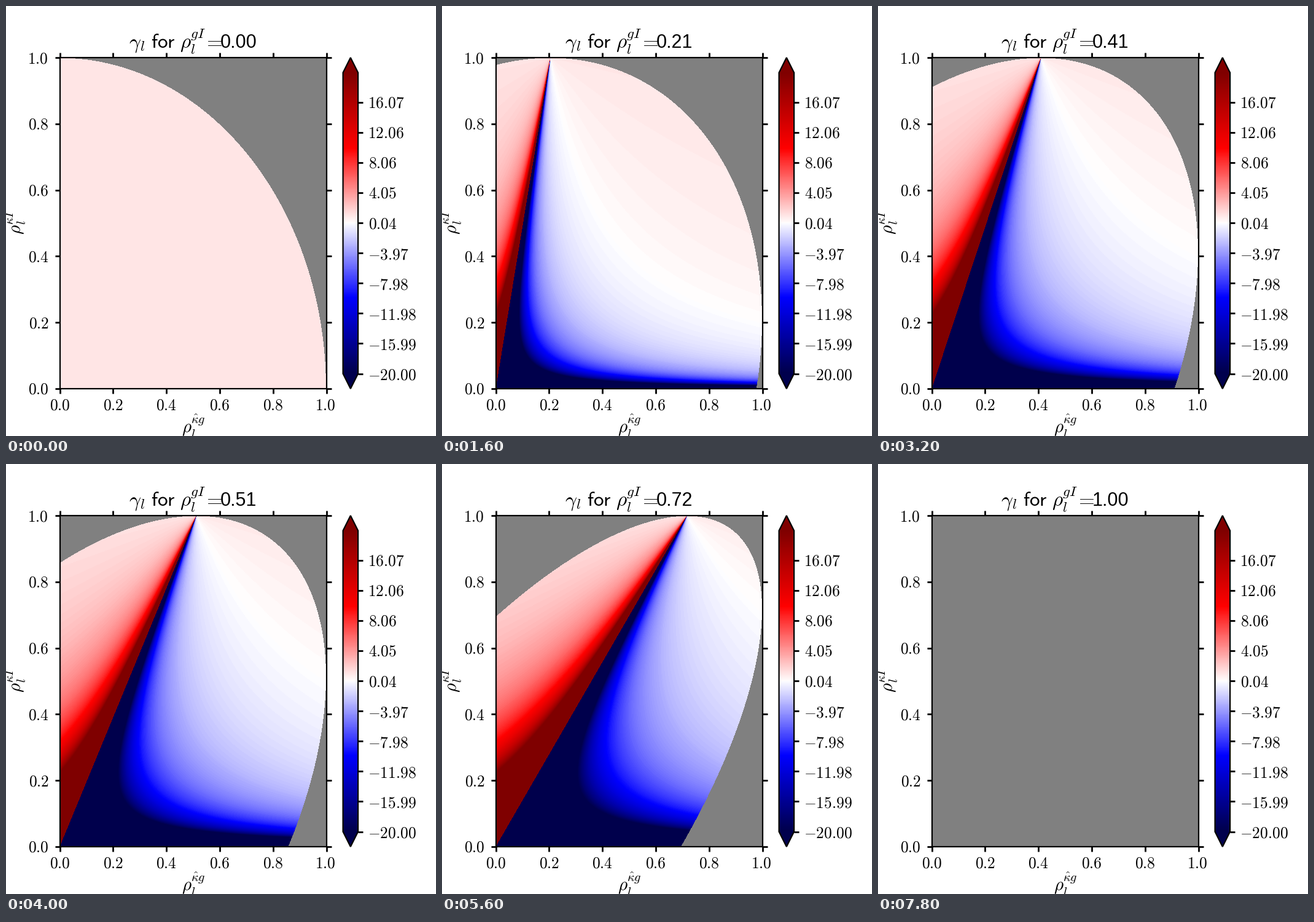
Animation, 700 px wide and 700 px high, one loop 8 s. Source, as a matplotlib script:

```python
import matplotlib.pyplot as plt
import numpy as np
from matplotlib.animation import FuncAnimation
from matplotlib.patches import Polygon, Rectangle

SIZE, DPI, FRAMES = 700, 200, 40
LEFT, RIGHT, TOP, BOTTOM = 87.5, 521.5, 84, 623
BAR_L, BAR_R, BAR_T, BAR_B = 548.6, 573.1, 108.5, 598.5
TICK = 8
LEVELS = np.linspace(-20, 20, 500)
STEP = LEVELS[1] - LEVELS[0]

plt.rcParams["mathtext.fontset"] = "cm"
cmap = plt.get_cmap("seismic").copy()
cmap.set_bad("grey")

fig = plt.figure(figsize=(SIZE / DPI, SIZE / DPI), dpi=DPI, facecolor="white")
ax = fig.add_axes([0, 0, 1, 1])
ax.axis("off")

# Cell corners and centres, one cell per pixel
cols, rows = 434, 539
cx, cy = np.meshgrid((np.arange(cols + 1) + 0.5) / cols,
                     1 - np.arange(rows + 1) / rows)
x = (cx[:-1, :-1] + cx[1:, 1:]) / 2
y = (cy[:-1, :-1] + cy[1:, 1:]) / 2


def gamma_field(r):
    """Banded gamma in the cells whose corners are all valid correlations."""
    ok = 1 - cx**2 - cy**2 - r**2 + 2 * cx * cy * r >= 0
    valid = ok[:-1, :-1] & ok[1:, :-1] & ok[:-1, 1:] & ok[1:, 1:]
    with np.errstate(divide="ignore", invalid="ignore"):
        g = (x * y - r) / (y * (x - r * y))
    band = np.clip(np.floor((g + 20) / STEP), -1, 499)
    return np.ma.masked_where(~valid | np.isnan(band), -20 + (band + 0.5) * STEP)


def show(data, extent):
    return ax.imshow(data, cmap=cmap, vmin=-20, vmax=20, extent=extent,
                     interpolation="nearest", aspect="auto", zorder=1)


def label(px, py, body, size, ha="left", rot=0):
    return ax.text(px, py, f"${body}$", fontsize=size, ha=ha, va="baseline",
                   rotation=rot, rotation_mode="anchor", zorder=5)


def rho(px, py, size, sup, rise=0.48, drop=0.302, rot=0):
    """Rho with subscript l and a superscript, set along the given direction."""
    em = size * DPI / 72
    c, s = np.cos(np.radians(rot)), np.sin(np.radians(rot))
    for body, dx, dy, k in ((r"\rho", 0, 0, 1), ("l", 0.517, -drop, 0.7),
                            (sup, 0.517, rise, 0.7)):
        label(px + em * (dx * c - dy * s), py - em * (dx * s + dy * c),
              body, size * k, rot=rot)


field = show(gamma_field(0), (88, 522, BOTTOM, TOP))
show((LEVELS[:-1] + STEP / 2)[::-1, None], (BAR_L, BAR_R, BAR_B, BAR_T))

# Frame and colour bar outline
edge = dict(fill=False, ec="black", lw=0.8, joinstyle="miter", zorder=4)
ax.add_patch(Rectangle((LEFT, TOP), RIGHT - LEFT, BOTTOM - TOP, **edge))
mid = (BAR_L + BAR_R) / 2
for base, tip, inner, color in ((BAR_T, TOP, BAR_T + 3, cmap(1.0)),
                                (BAR_B, BOTTOM, BAR_B - 3, cmap(0.0))):
    ax.add_patch(Polygon([(BAR_L, inner), (BAR_L, base), (mid, tip),
                          (BAR_R, base), (BAR_R, inner)],
                         fc=color, ec="none", zorder=0.5))
ax.add_patch(Polygon([(BAR_L, BAR_T), (mid, TOP), (BAR_R, BAR_T),
                      (BAR_R, BAR_B), (mid, BOTTOM), (BAR_L, BAR_B)], **edge))

# Ticks and their labels
line = dict(colors="black", lw=1.0, zorder=4)
for v in np.linspace(0, 1, 6):
    tx, ty = LEFT + v * (RIGHT - LEFT), BOTTOM - v * (BOTTOM - TOP)
    ax.vlines([tx, tx], [TOP - TICK, BOTTOM], [TOP, BOTTOM + TICK], **line)
    ax.hlines([ty, ty], [LEFT - TICK, RIGHT], [LEFT, RIGHT + TICK], **line)
    shift = 2 if v == 1 else 0
    label(tx - shift, 658, f"{v:.1f}", 9.2, ha="center")
    label(70 - shift / 2, ty + 9, f"{v:.1f}", 9.2, ha="right")

for v in LEVELS[::50]:
    ty = BAR_B - (v + 20) / 40 * (BAR_B - BAR_T)
    ax.hlines(ty, BAR_R, BAR_R + TICK, **line)
    label(589 if v < 0 or v > 10 else 590, ty + (10 if v < 0 else 9),
          f"{v:.2f}", 9.2)

rho(285.5, 694.5, 10.5, r"\hat{\kappa}g")
rho(24, 371.5, 10.5, r"\hat{\kappa}I", rise=0.363, drop=0.283, rot=90)

# Title
label(199.5, 68, r"\gamma", 12)
label(217.5, 73, "l", 8.4)
label(236, 68, r"\mathsf{for}", 12)
rho(283, 68, 12, "gI")
label(336.5, 68, "=", 12, ha="center")
value = ax.text(349, 68, "0.00", fontsize=11, family="Liberation Sans",
                va="baseline", zorder=5)

ax.set_xlim(0, SIZE)
ax.set_ylim(SIZE, 0)


def update(i):
    r = i / (FRAMES - 1)
    field.set_data(gamma_field(r))
    value.set_text(f"{r:.2f}")
    return field, value


anim = FuncAnimation(fig, update, frames=FRAMES, interval=200, repeat=True)
plt.show()
```
